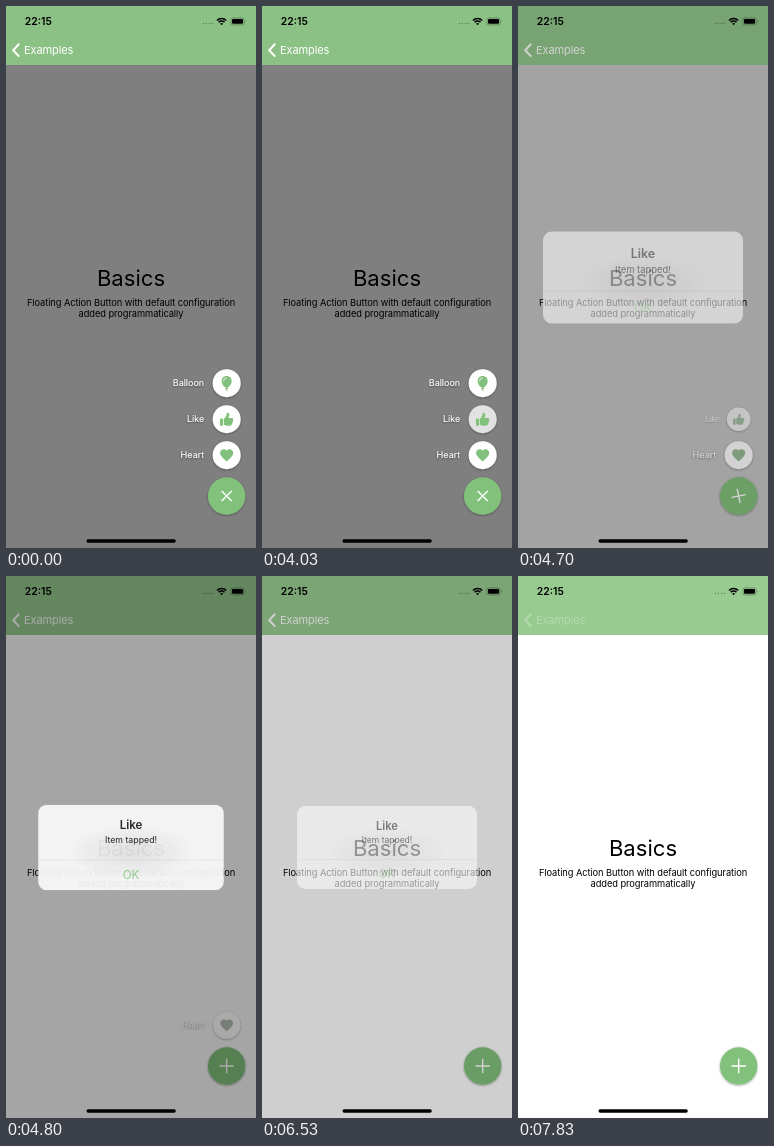
An HTML page that plays this animation: 250 by 542 pixels, repeating every 8000 ms.

```html
<!DOCTYPE html>
<html lang="en">
<head>
<meta charset="utf-8">
<title>Floating action button</title>
<style>
  html, body { margin: 0; width: 100%; height: 100%; overflow: hidden; background: #fff; }
  svg { display: block; width: 100%; height: 100%; }
  text { font-family: Inter, Roboto, "Liberation Sans", sans-serif; }
  .mid { text-anchor: middle; }
  .label { font-size: 9px; fill: #fff; text-anchor: end; filter: url(#labelShadow); }
  .disc { filter: url(#discShadow); }
</style>
</head>
<body>
<svg viewBox="0 0 250 542" preserveAspectRatio="none">
  <defs>
    <filter id="discShadow" x="-30%" y="-30%" width="160%" height="160%">
      <feDropShadow dx="0" dy="0.7" stdDeviation="1.3" flood-opacity=".4"/>
    </filter>
    <filter id="labelShadow" x="-20%" y="-50%" width="140%" height="200%">
      <feDropShadow dx="0" dy="0.7" stdDeviation="0.9" flood-opacity=".5"/>
    </filter>
    <radialGradient id="smudge">
      <stop offset="0" stop-opacity=".08"/>
      <stop offset=".5" stop-opacity=".045"/>
      <stop offset="1" stop-opacity="0"/>
    </radialGradient>
    <clipPath id="alertClip"><rect x="35" y="230" width="180" height="83" rx="8.5"/></clipPath>
  </defs>

  <rect width="250" height="542" fill="#fff"/>
  <text class="mid" x="125" y="280" font-size="22.1">Basics</text>
  <g class="mid" font-size="9.32" letter-spacing="-.09">
    <text x="125" y="299.8">Floating Action Button with default configuration</text>
    <text x="125" y="311">added programmatically</text>
  </g>

  <rect id="overlay" y="58" width="250" height="484"/>

  <g id="items"></g>
  <g transform="translate(220.67 490)">
    <circle class="disc" r="18.67" fill="#82c17b"/>
    <path id="plus" d="M-7.2 0H7.2M0-7.2V7.2" stroke="#fff" stroke-width="1.4"/>
  </g>

  <rect id="bar" width="250" height="59"/>
  <g id="back">
    <path d="M13.2 37.8L7.2 44.2L13.2 50.6" fill="none" stroke="#fff" stroke-width="2"/>
    <text x="18" y="48" font-size="11" letter-spacing="-.1" fill="#fff">Examples</text>
  </g>

  <rect id="dim" width="250" height="542"/>

  <text x="18.8" y="19" font-size="10.4" font-weight="600">22:15</text>
  <g id="dots" fill-opacity=".3"></g>
  <g transform="translate(215.6 19)" fill="none" stroke="#000" stroke-width="1.6">
    <path d="M-4.6-4.5A6.4 6.4 0 0 1 4.6-4.5M-2.9-2.7A4 4 0 0 1 2.9-2.7"/>
    <path d="M0 .2L-1.5-1.4A2.2 2.2 0 0 1 1.5-1.4Z" fill="#000" stroke="none"/>
  </g>
  <rect x="224.9" y="11.9" width="13.2" height="7" rx="2.1" fill="none" stroke="#000" stroke-opacity=".4" stroke-width=".7"/>
  <rect x="226" y="13" width="11" height="4.8" rx="1.1"/>
  <path d="M239 14.2q1.2 1.2 0 2.4z" fill-opacity=".45"/>
  <rect x="80.5" y="533.3" width="89.3" height="3.4" rx="1.7"/>

  <g id="alert">
    <g id="panel" clip-path="url(#alertClip)">
      <rect x="35" y="230" width="180" height="83" fill="#f9f9f9"/>
      <ellipse cx="125" cy="276" rx="62" ry="26" fill="url(#smudge)"/>
      <rect id="okRow" x="35" y="283.8" width="180" height="30" fill-opacity=".1"/>
      <rect x="35" y="283.4" width="180" height=".5" fill-opacity=".12"/>
    </g>
    <g id="message" class="mid">
      <text x="125" y="253.8" font-size="11.2" font-weight="600">Like</text>
      <text x="125" y="267.2" font-size="8.5">Item tapped!</text>
      <text x="125" y="302.3" font-size="11.2" fill="#82c17b">OK</text>
    </g>
  </g>
</svg>
<script>
const LOOP = 8000;
const TIMES = { press: 4030, tap: 4630, shown: 5100, okPress: 5900, okTap: 6400, gone: 6830, back: 7830 };
const GREEN = [130, 193, 123], GREY = [182, 182, 182];
const BAR_LIGHT = [151, 203, 143], BAR_SHADED = [140, 193, 133];

const $ = id => document.getElementById(id);
const clamp = v => Math.min(1, Math.max(0, v));
const span = (t, start, length) => clamp((t - start) / length);
const smooth = u => u * u * (3 - 2 * u);
const mix = (a, b, u) => `rgb(${a.map((v, i) => Math.round(v + (b[i] - v) * u))})`;
const fade = (id, v) => $(id).setAttribute("opacity", v);
const within = (t, from, to) => t >= from && t < to;

// Critically damped spring from 0 to 1, time in ms
function spring(ms, rate) {
  const x = Math.max(0, ms) * rate / 1000;
  return 1 - (1 + x) * Math.exp(-x);
}

const ICONS = {
  balloon: `<path d="M0-7.2C3-7.2 5-5 5-2.2C5 1 2.6 3.7 .7 4.4L1.6 5.9H.4L.9 8H-.1L-.5 5.9H-1.6L-.7 4.4C-2.6 3.7-5 1-5-2.2C-5-5-3-7.2 0-7.2Z"/>
    <path d="M-3.1-2.3A3.1 3.1 0 0 1-.2-5.3" fill="none" stroke="#fff" stroke-width=".8" stroke-linecap="round"/>`,
  like: `<rect x="-6.7" y="-.7" width="3" height="7.2" rx=".6"/>
    <path d="M-2.9-.4C-1.4-1.6-.2-3-.1-5.3C0-6.9 2.4-6.9 2.6-4.6C2.7-3.4 2-2.2 1.8-1.3H5.2C6.8-1.3 7.1.4 6.1 1C6.7 1.8 6.4 2.8 5.7 3.2C6 4.1 5.6 4.8 5 5.1C5 6.2 4.2 6.6 3.2 6.6H1C-.6 6.6-1.6 5.9-2.9 5.6Z"/>`,
  heart: `<path transform="scale(.66) translate(-12 -12)" d="M12 21.4l-1.5-1.3C5.4 15.4 2 12.3 2 8.5 2 5.4 4.4 3 7.5 3c1.7 0 3.4.8 4.5 2.1C13.1 3.8 14.8 3 16.5 3 19.6 3 22 5.4 22 8.5c0 3.8-3.4 6.9-8.5 11.6z"/>`
};

const items = [
  { label: "Balloon", icon: "balloon", y: 377.2, close: 4528 },
  { label: "Like", icon: "like", y: 413.2, close: 4650 },
  { label: "Heart", icon: "heart", y: 449.2, close: 4780 }
];

$("items").innerHTML = items.map(({ label, icon }) => `<g>
  <text class="label" x="-22.5" y="3.1">${label}</text>
  <circle class="disc" r="14" fill="#fff"/>
  <g class="icon">${ICONS[icon]}</g>
</g>`).join("");
items.forEach((item, i) => {
  item.node = $("items").children[i];
  item.disc = item.node.querySelector(".disc");
  item.glyph = item.node.querySelector(".icon");
});
$("dots").innerHTML = [0, 1, 2, 3]
  .map(i => `<circle cx="${197.3 + i * 3.1}" cy="17.5" r=".8"/>`).join("");

function drawItem(item, t, tint, pressed) {
  const u = smooth(span(t, item.close, 150));
  item.node.setAttribute("transform", `translate(220.67 ${item.y}) scale(${1 - 0.6 * u})`);
  item.node.setAttribute("opacity", 1 - u);
  item.glyph.setAttribute("fill", mix(GREEN, GREY, tint));
  item.disc.setAttribute("fill", pressed ? "#e2e2e2" : "#fff");
}

function draw(t) {
  // The menu stays fully open until the tap takes effect
  const menuTime = t < TIMES.tap ? 0 : t;

  let shown = 0;
  if (t >= TIMES.tap) shown = t < TIMES.shown ? spring(t - 4618, 18) : 1;
  const zoom = 1.2 - 0.2 * shown;
  if (t >= TIMES.okTap) shown = (1 - span(t, 6395, TIMES.gone - 6395)) ** 2;

  const shade = 1 - smooth(span(menuTime, 4540, 300));
  fade("overlay", 0.5 * shade);
  $("bar").setAttribute("fill", mix(BAR_LIGHT, BAR_SHADED, shade));

  const pressing = within(t, TIMES.press, TIMES.tap);
  items.forEach(item => drawItem(item, menuTime, shown, pressing && item.icon === "like"));

  const angle = -45 * (1 - smooth(span(menuTime, 4540, 240)));
  $("plus").setAttribute("transform", `rotate(${angle})`);

  fade("dim", 0.4 * shown);
  // The panel's blur layer makes it denser than its text
  fade("panel", 1 - (1 - shown) ** 1.5);
  fade("message", shown);
  $("alert").setAttribute("transform",
    `translate(125 271.5) scale(${zoom}) translate(-125 -271.5)`);
  fade("okRow", within(t, TIMES.okPress, TIMES.okTap) ? 1 : 0);
  fade("back", t >= TIMES.back ? 0.28 : 1);
}

const start = performance.now();
function tick() {
  draw((performance.now() - start) % LOOP);
  requestAnimationFrame(tick);
}
tick();
</script>
</body>
</html>
```
